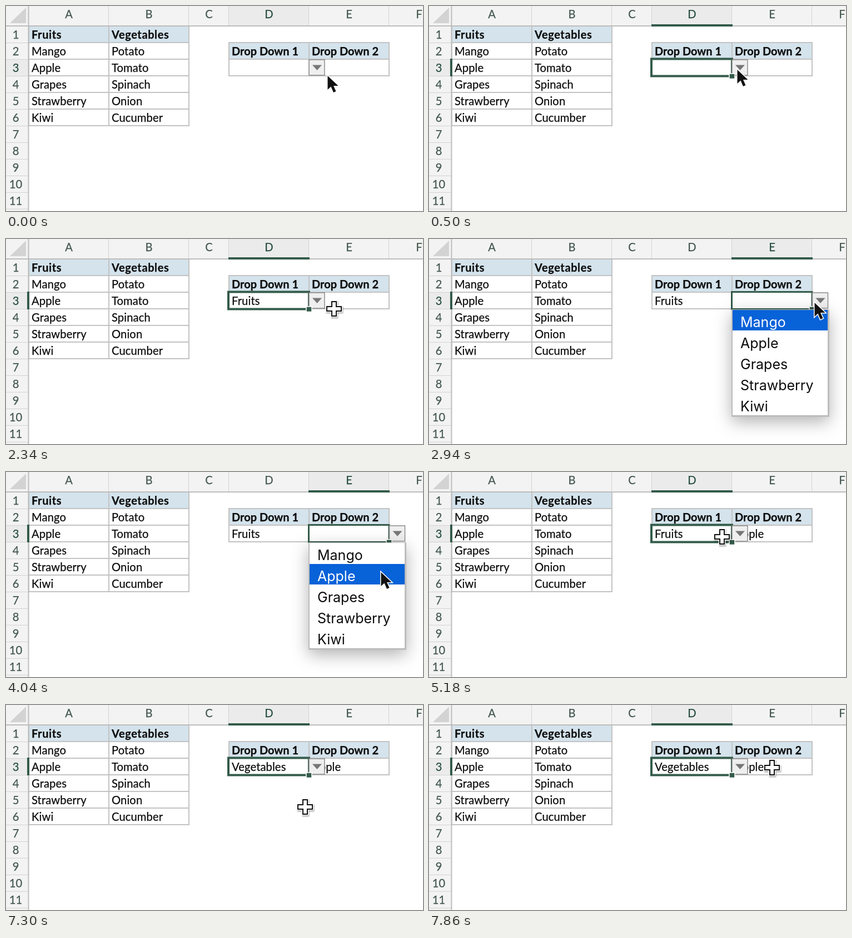
Animation, 750 px wide and 370 px high, one loop 8 s. Source, as an HTML page:

```html
<!DOCTYPE html>
<html lang="en">
<head>
<meta charset="utf-8">
<title>Dependent drop-down lists</title>
<style>
  html, body { margin: 0; width: 100%; height: 100%; overflow: hidden; background: #fff; }
  svg { display: block; width: 750px; height: 370px; }
  text { font: 20.2px Lato, sans-serif; letter-spacing: .1px; fill: #0c0c0c; stroke: #0c0c0c; stroke-width: .25; white-space: pre; }
  .head { font-weight: 700; font-size: 20px; letter-spacing: .6px; }
  .tight { letter-spacing: 0; }
  .axis { fill: #43574f; stroke: #43574f; text-anchor: middle; letter-spacing: 0; }
  .axis.on { fill: #254d3e; stroke: #254d3e; }
  .item { font: 25px Inter, sans-serif; font-optical-sizing: none; letter-spacing: 0; stroke: none; }
  .panel { filter: drop-shadow(0 9px 15px rgba(0, 0, 0, .3)); }
  .cross { filter: drop-shadow(1px 2px 1px rgba(0, 0, 0, .35)); }
</style>
</head>
<body>
<svg id="stage" viewBox="0 0 750 370"></svg>
<script>
const LOOP = 8000;
const GREEN = '#335b4a', BLUE = '#0862d8', LINE = '#c3c3c3', HEAD = '#f3f3f3', SHADE = '#ebebeb', TINT = '#d4e3ec';
const stage = document.getElementById('stage');

function add(parent, tag, attrs = {}, label) {
  const node = document.createElementNS('http://www.w3.org/2000/svg', tag);
  for (const key in attrs) node.setAttribute(key, attrs[key]);
  if (label !== undefined) node.textContent = label;
  parent.appendChild(node);
  return node;
}
const rect = (parent, x, y, width, height, fill, more) =>
  add(parent, 'rect', { x, y, width, height, fill, ...more });
const label = (parent, x, y, value, cls = '') => add(parent, 'text', { x, y, class: cls }, value);
const group = parent => add(parent, 'g');
const show = (node, on) => { node.style.display = on ? '' : 'none'; };

// Sheet
const edges = [41, 185, 329, 401, 545, 689, 797];
const letters = 'ABCDEF';
const fruits = ['Mango', 'Apple', 'Grapes', 'Strawberry', 'Kiwi'];
const vegetables = ['Potato', 'Tomato', 'Spinach', 'Onion', 'Cucumber'];

rect(stage, 0, 0, 750, 370, '#fff');
rect(stage, 0, 0, 750, 36, HEAD);
rect(stage, 0, 0, 40, 370, HEAD);

const colShade = rect(stage, 401, 0, 144, 35, SHADE);
rect(stage, 0, 97, 40, 29, SHADE);

for (const x of edges) rect(stage, x - 1, 0, 1, 36, '#d2d2d2');
for (let y = 66; y < 370; y += 30) rect(stage, 0, y, 40, 1, '#d2d2d2');
add(stage, 'path', { d: 'M36 3V31H7Z', fill: '#d3d3d3' });

const colLabels = [...letters].map((c, i) =>
  label(stage, (edges[i] + edges[i + 1]) / 2, 21.5, c, 'axis'));
for (let row = 1; row <= 11; row++)
  label(stage, 17.5, 29 + row * 30, row, row === 3 ? 'axis on' : 'axis');

function table(x, y, rows) {
  rect(stage, x, y, 288, 30, TINT);
  for (let i = 0; i <= rows; i++) rect(stage, x - 1, y - 1 + i * 30, 290, 2, LINE);
  for (let i = 0; i < 3; i++) rect(stage, x - 1 + i * 144, y - 1, 2, rows * 30 + 2, LINE);
}
table(41, 36, 6);
table(401, 66, 2);
rect(stage, 0, 35, 750, 2, '#bdbdbd');
rect(stage, 39.5, 0, 2, 370, '#bdbdbd');

label(stage, 46, 59, 'Fruits', 'head');
label(stage, 190, 59, 'Vegetables', 'head');
fruits.forEach((name, i) => label(stage, 46, 89 + i * 30, name));
vegetables.forEach((name, i) => label(stage, 190, 89 + i * 30, name));
label(stage, 406, 89, 'Drop Down 1', 'head tight');
label(stage, 550, 89, 'Drop Down 2', 'head tight');
const first = label(stage, 406, 119, '');
const second = label(stage, 550, 119, '');

// Selection, moved by one column when E is active
const marks = group(stage);
rect(marks, 400, 33, 146, 4, GREEN);
const rowMark = rect(stage, 38, 95, 4, 32, GREEN);
const frame = group(marks);
const button = group(stage);
rect(button, 545, 97, 28, 28, '#efefef', { stroke: '#8d8d8d', 'stroke-width': 1.5 });
add(button, 'path', { d: 'M551 106.5H568L559.5 116Z', fill: '#777' });
const handle = group(stage);
rect(handle, 540, 122, 10, 9.5, GREEN, { stroke: '#fff', 'stroke-width': 1.5 });
const thin = rect(frame, 400.5, 95.5, 144.5, 31, 'none', { stroke: GREEN, 'stroke-width': 3 });
const thick = rect(frame, 400, 95.5, 145, 31, 'none', { stroke: GREEN, 'stroke-width': 4 });

// Drop-down lists
function list(x, width, names) {
  const root = group(stage);
  const height = names.length * 38 + 4;
  rect(root, x, 127, width, height, '#bcbcbc', { class: 'panel' });
  rect(root, x + 2, 128, width - 5, height - 4, '#fff');
  const bar = rect(root, x + 2, 128, width - 5, 37, BLUE);
  const items = names.map((name, i) => label(root, x + 16, 159 + i * 38, name, 'item'));
  return pick => {
    show(root, pick >= 0);
    if (pick < 0) return;
    bar.setAttribute('y', 128 + pick * 38);
    items.forEach((item, i) => { item.style.fill = i === pick ? '#fff' : ''; });
  };
}
const listD = list(400, 178, ['Fruits', 'Vegetables']);
const listE = list(544, 176, fruits);

// Pointers
const arrow = group(stage);
add(arrow, 'path', {
  d: 'M1.5 4v25l6-5.5 4.5 10.5 4.5-2-4.5-10h8.5Z',
  fill: '#111', stroke: '#fff', 'stroke-width': 3, 'paint-order': 'stroke'
});
const cross = add(stage, 'g', { class: 'cross' });
const plus = 'M-4-13H4V-4H13V4H4V13H-4V4H-13V-4H-4Z';
add(cross, 'path', { d: plus, fill: 'none', stroke: '#fff', 'stroke-width': 4.5 });
add(cross, 'path', { d: plus, fill: '#fff', stroke: '#111', 'stroke-width': 2 });

// Pointer steps: time, shape, x, y
const moves = [
  [0, 'a', 577, 122], [200, 'a', 570, 118], [300, 'a', 562, 114], [500, 'a', 553, 111],
  [1500, 'a', 541, 132],
  [2000, 'p', 556, 143], [2200, 'p', 590, 126], [2400, 'p', 625, 114], [2600, 'p', 640, 113],
  [2800, 'a', 692, 111], [3840, 'a', 683, 145], [4040, 'a', 673, 177],
  [4540, 'p', 674, 180], [5040, 'p', 588, 144], [5180, 'p', 527, 117],
  [5680, 'a', 553, 110], [6180, 'a', 551, 120], [6320, 'a', 548, 131], [6460, 'a', 543, 142],
  [6600, 'a', 538, 149], [6800, 'a', 532, 180],
  [7300, 'p', 538, 184], [7440, 'p', 560, 163], [7580, 'p', 582, 143], [7720, 'p', 602, 126],
  [7860, 'p', 617, 113]
];
// Sheet steps: time, active column, first value, second value, open item (-1 = closed)
const states = [
  [0, '', '', '', -1], [500, 'D', '', '', -1], [1000, 'D', '', '', 0],
  [2000, 'D', 'Fruits', '', -1], [2600, 'E', 'Fruits', '', -1],
  [2940, 'E', 'Fruits', '', 0], [4040, 'E', 'Fruits', '', 1],
  [4540, 'E', 'Fruits', 'Apple', -1], [5180, 'D', 'Fruits', 'Apple', -1],
  [5680, 'D', 'Fruits', 'Apple', 0], [6800, 'D', 'Fruits', 'Apple', 1],
  [7300, 'D', 'Vegetables', 'Apple', -1]
];
const at = (steps, t) => steps.reduce((last, step) => step[0] <= t ? step : last);

let shown;
function drawState(state) {
  if (state === shown) return;
  shown = state;
  const [, col, one, two, pick] = state;
  const isE = col === 'E', open = pick >= 0;
  const shift = `translate(${isE ? 144 : 0} 0)`;
  [colShade, marks, handle].forEach(node => node.setAttribute('transform', shift));
  button.setAttribute('transform', `translate(${isE ? 144.5 : 0} 0)`);
  [marks, rowMark, handle].forEach(node => show(node, col));
  show(thin, open);
  show(thick, !open);
  colLabels[3].classList.toggle('on', !isE);
  colLabels[4].classList.toggle('on', isE);
  first.textContent = one;
  second.textContent = two;
  listD(isE ? -1 : pick);
  listE(isE ? pick : -1);
}

function draw(now) {
  const t = now % LOOP;
  drawState(at(states, t));
  const [, shape, x, y] = at(moves, t);
  show(arrow, shape === 'a');
  show(cross, shape === 'p');
  (shape === 'a' ? arrow : cross).setAttribute('transform', `translate(${x} ${y})`);
}

let start;
function tick(now) {
  start ??= now;
  draw(Math.max(0, now - start));
  requestAnimationFrame(tick);
}
draw(0);
requestAnimationFrame(tick);
</script>
</body>
</html>
```
